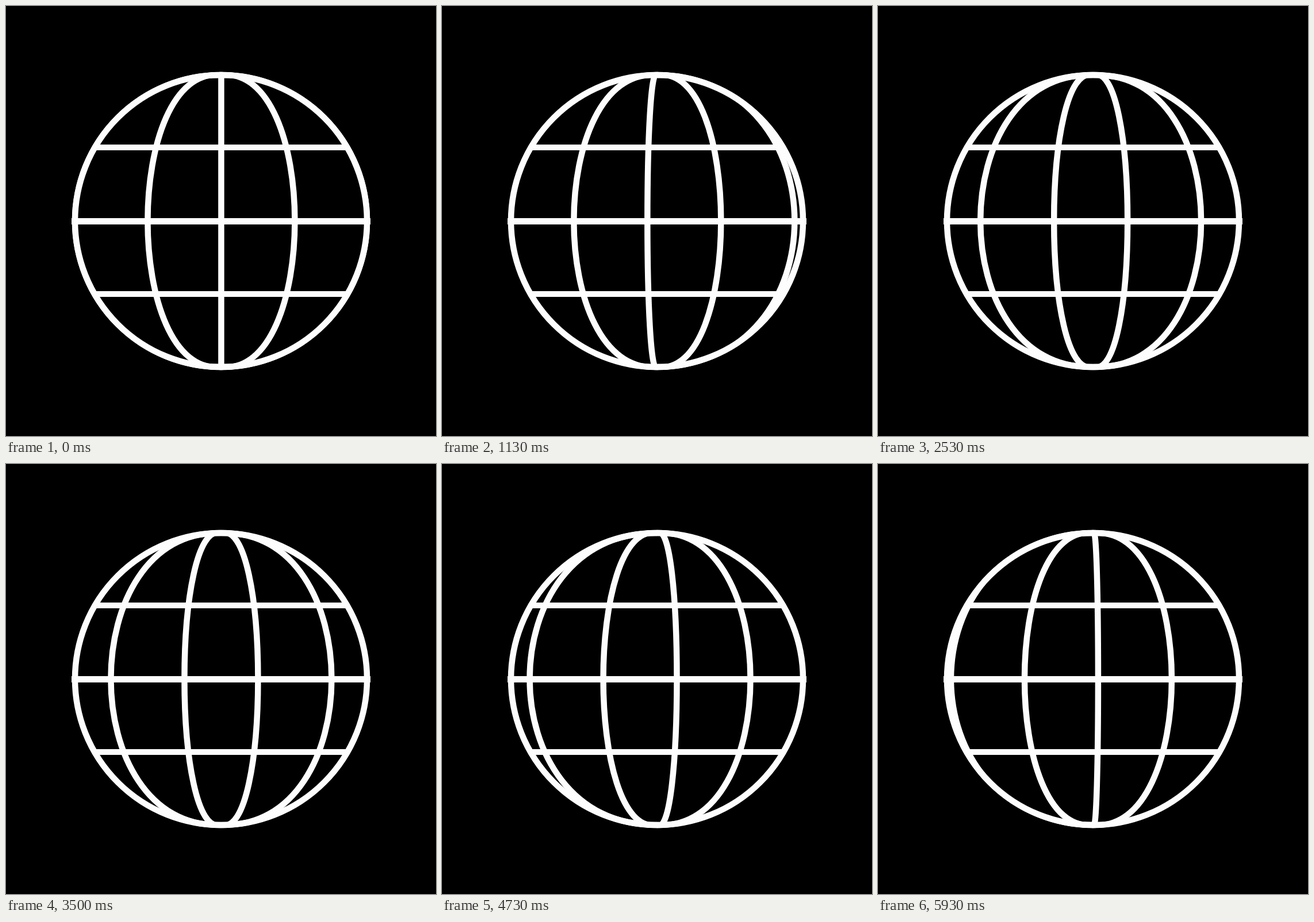
These frames come from a looping animation (748x748 px, 6010 ms). An HTML page with a canvas:

```html
<!DOCTYPE html>
<html lang="en">
<head>
<meta charset="utf-8">
<title>Turning globe</title>
<style>
  html, body { margin: 0; width: 100%; height: 100%; overflow: hidden; background: #000; }
  canvas { display: block; width: 748px; height: 748px; }
</style>
</head>
<body>
<canvas id="stage" width="748" height="748"></canvas>
<script>
const ctx = document.getElementById('stage').getContext('2d');
const LOOP = 6010, LAST_TICK = 178;
const MID = 374, R = 254, LINE = 10.5;
const AXIS = 374.4, GAP = 128;

// Ticks of 1/30 s, with every third one skipped.
function turnAt(ms) {
  const tick = 3 * Math.floor(ms / 100) + (ms % 100 >= 30 ? 1 : 0);
  return Math.min(tick, LAST_TICK) / 30 % 1;
}

function disc(radius) {
  ctx.beginPath();
  ctx.arc(MID, MID, radius, 0, 2 * Math.PI);
}

function bar(y, height, half) {
  ctx.fillRect(MID - half, y - height / 2, 2 * half, height);
}

// Half an oval from pole to pole; narrow ones have fuller shoulders.
function meridian(bulge) {
  const x = AXIS + bulge * 4 / 3;
  const reach = R * (1.14 - 0.14 * Math.abs(bulge) / R);
  ctx.beginPath();
  ctx.moveTo(AXIS, MID - R);
  ctx.bezierCurveTo(x, MID - reach, x, MID + reach, AXIS, MID + R);
  ctx.stroke();
}

function draw(ms) {
  ctx.fillStyle = '#000';
  ctx.fillRect(0, 0, 748, 748);
  ctx.fillStyle = ctx.strokeStyle = '#fdfdfd';
  ctx.lineWidth = LINE;

  disc(R);
  ctx.stroke();
  bar(374.5, 11, 260);
  bar(246, 10, 219);
  bar(501, 10, 219);

  ctx.save();
  disc(R + LINE / 2);
  ctx.clip();
  const turn = turnAt(ms);
  for (let i = -2; i <= 2; i++) {
    const bulge = (i - turn) * GAP;
    if (Math.abs(bulge) <= 2 * GAP) meridian(bulge);
  }
  ctx.restore();
}

const start = performance.now();
function loop() {
  draw((performance.now() - start) % LOOP);
  requestAnimationFrame(loop);
}
loop();
</script>
</body>
</html>
```
